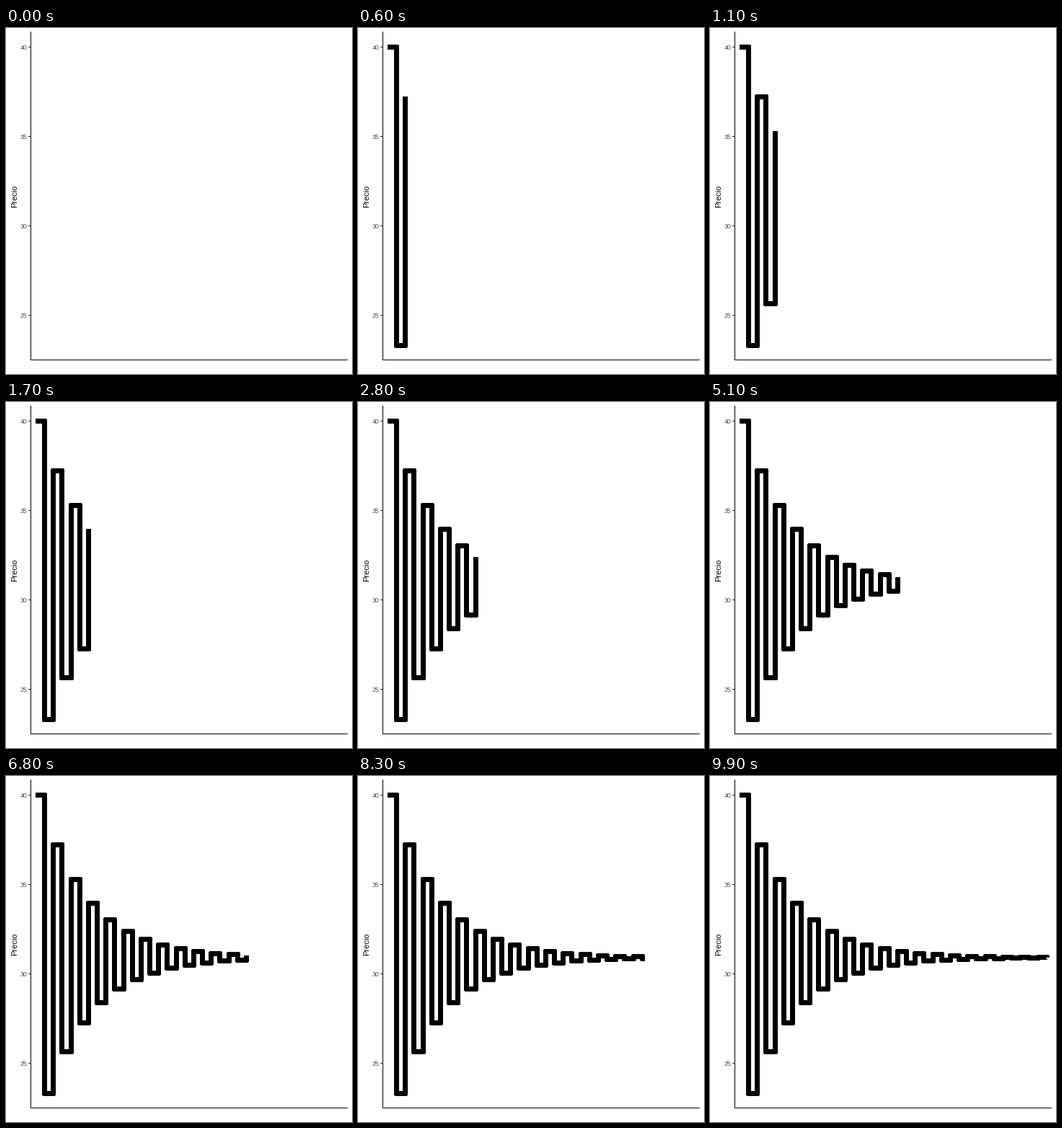
Animation of 480x480 px, one loop 10000 ms. Source, as a matplotlib script:

```python
import numpy as np
import matplotlib.pyplot as plt
from matplotlib.animation import FuncAnimation
from matplotlib.patches import Rectangle

SIZE, FRAMES, STEPS = 480, 100, 35

plt.rcParams["font.family"] = ["Liberation Sans", "DejaVu Sans"]
plt.rcParams["toolbar"] = "None"

fig = plt.figure(figsize=(SIZE / 72, SIZE / 72), dpi=72, facecolor="white")
ax = fig.add_axes([0, 0, 1, 1])
ax.set_xlim(0, SIZE)
ax.set_ylim(SIZE, 0)
ax.axis("off")


def px(step):
    return np.floor(41.32 + 12.171 * step)


def py(price):
    return np.floor(26.505 + 24.81 * (40 - price))


def bar(x, y, w, h, color):
    ax.add_patch(Rectangle((x, y), w, h, fc=color, lw=0, antialiased=False))


# Cobweb prices: each period overshoots the equilibrium by 5/6
prices = [40.0]
for _ in range(STEPS):
    prices.append((340 - 5 * prices[-1]) / 6)
arrive = np.round(np.arange(STEPS + 1) * (FRAMES - 1) / STEPS).astype(int)

# Axes
for price in (40, 35, 30, 25):
    row = py(price)
    bar(31, row, 3, 1, "#333333")
    ax.text(29.4, row + 4.5, str(price), size=8.8, color="#4D4D4D",
            ha="right", va="baseline")
bar(34, 5, 1, 456, "black")
bar(34, 460, 440, 1, "black")
ax.text(15, 233.5, "Precio", size=11, color="black", rotation=90,
        rotation_mode="anchor", ha="center", va="baseline")

line, = ax.plot([], [], color="black", lw=7, antialiased=False, snap=False,
                solid_capstyle="butt", solid_joinstyle="round")


def staircase(i):
    """Points of the stepped line revealed up to frame i."""
    if i == 0:
        return [], []
    k = int(np.searchsorted(arrive, i, side="right")) - 1
    xs, ys = [px(0)], [py(prices[0]) + 0.5]
    for j in range(1, k + 1):
        x = px(j) + 0.5
        xs += [x, x]
        ys += [py(prices[j - 1]) + 0.5, py(prices[j]) + 0.5]
    if i > arrive[k]:
        part = (i - arrive[k]) / (arrive[k + 1] - arrive[k])
        xs.append(px(k + part))
        ys.append(ys[-1])
    else:
        ys[-1] -= 0.5
    return xs, ys


def update(i):
    line.set_data(*staircase(i))
    return line,


anim = FuncAnimation(fig, update, frames=FRAMES, interval=100,
                     repeat=True, repeat_delay=0, blit=False)
plt.show()
```
